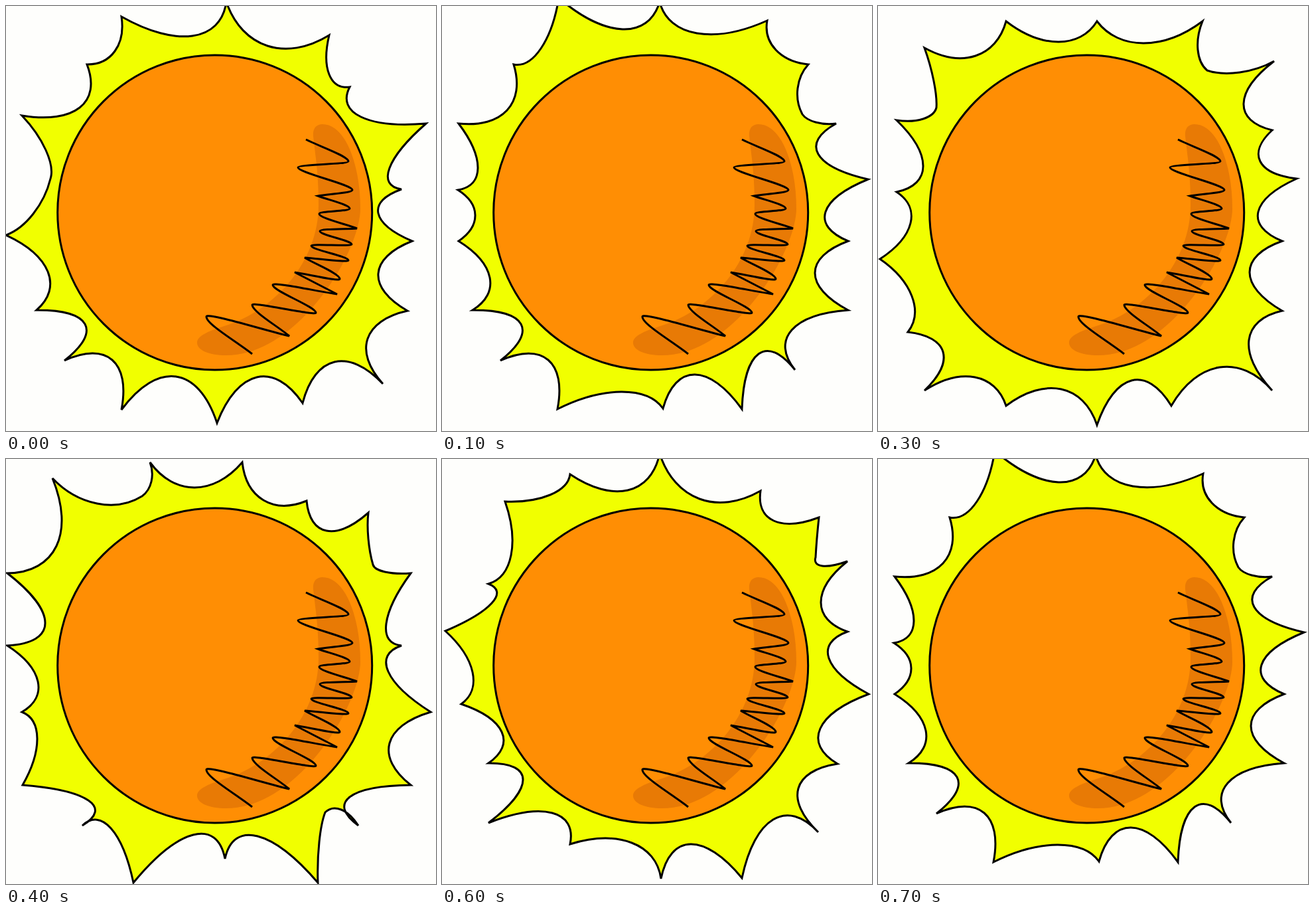
An HTML page for the animation above (0.8 s loop, 648 by 640 pixels).

```html
<!DOCTYPE html>
<html lang="en">
<head>
<meta charset="utf-8">
<title>Sun</title>
<style>
  html, body { margin: 0; width: 100%; height: 100%; overflow: hidden; background: #fefefc; }
  svg { display: block; width: 648px; height: 640px; }
  .ink { stroke: #000; stroke-width: 3; fill: none; }
  .rays { fill: #f1ff00; visibility: hidden; }
  .core { fill: #ff8e04; }
</style>
</head>
<body>
<svg viewBox="0 0 648 640">
  <!-- Ray outlines: tip, dip, tip, dip ... clockwise from the lower right -->
  <path class="ink rays" data-points="568,569 495,536 447,598 378,559 318,628 256,558 174,608 160,533 88,534
    119,479 46,458 63,400 0,345 41,313 67,260 60,217 24,165 111,153 122,88 164,68 174,16 281,45 332,-6
    394,60 487,44 487,103 518,122 535,167 633,177 578,244 596,276 561,312 612,354 561,403 605,459 545,501 568,569"/>
  <path class="ink rays" data-points="532,548 477,524 452,607 381,555 333,606 270,581 174,607 160,533 88,534
    119,479 46,458 72,409 25,354 50,315 24,277 54,244 25,177 98,157 108,88 149,64 176,-12 272,35 328,-6
    384,41 490,22 503,66 552,88 536,124 543,163 563,175 594,177 567,223 642,261 578,310 612,354 562,402 612,458
    527,488 532,548"/>
  <path class="ink rays" data-points="567,562 499,543 452,631 375,580 330,632 286,578 193,580 166,533 70,548
    122,483 70,458 90,411 29,369 46,321 5,259 75,217 70,188 104,145 95,64 163,54 193,23 280,47 328,-8
    388,60 480,48 500,93 568,88 565,120 563,148 573,161 611,154 571,216 611,260 583,300 643,354 570,406 596,459
    537,496 567,562"/>
  <path class="ink rays" data-points="594,579 515,544 442,602 382,564 330,631 276,577 193,602 146,559 70,579
    98,521 45,491 51,437 3,381 49,327 28,280 68,241 28,172 68,170 88,153 84,113 70,63 147,75 193,23 272,54 330,23
    400,56 489,23 482,66 496,97 545,100 597,83 551,147 594,187 576,234 631,260 573,310 609,354 560,401 609,459
    559,503 594,579"/>
  <path class="ink rays" data-points="531,552 505,528 481,532 472,577 470,638 379,568 330,602 282,566 192,638
    158,556 115,552 124,514 25,491 47,421 24,381 48,335 2,281 59,247 2,172 76,131 70,29 137,67 205,56 219,34 217,5
    284,43 356,5 388,62 453,63 483,108 546,81 546,120 553,159 571,170 610,172 573,248 596,281 576,320 640,381
    578,428 610,491 518,509 531,552"/>
  <circle class="ink core" cx="314.7" cy="311" r="237"/>
  <path fill="#e87a05" d="M463 196C462 184 468 178 477 178C512 178 534 240 534 305S440 526 332 526
    C305 526 288 518 288 507S307 489 332 481C405 458 471 385 471 300C471 250 466 225 463 196Z"/>
  <!-- Turning points of the scribble; "!" marks a sharp one -->
  <path class="ink" id="scribble" data-points="452,201! 516,234 440,243 522,277 470,286! 518,305 472,313 529,335!
    473,339 521,359 460,361 516,383 450,379! 503,411 435,401! 499,434! 402,420 467,462 371,450 427,497! 302,468 371,524!"/>
</svg>
<script>
const STEP = 100;
const SPREAD = 0.42;

const readPoints = el => el.dataset.points.trim().split(/\s+/).map(word => {
  const [x, y] = word.split(",").map(parseFloat);
  return { x, y, sharp: word.endsWith("!") };
});

const curve = (a, b, end) => `C${a.x} ${a.y} ${b.x} ${b.y} ${end.x} ${end.y}`;

// Cubic from p to q whose middle is the dip m.
function scallop(p, m, q) {
  const handle = (axis, side) =>
    ((8 * m[axis] - p[axis] - q[axis]) / 3 + side * SPREAD * (p[axis] - q[axis])) / 2;
  return curve({ x: handle("x", 1), y: handle("y", 1) }, { x: handle("x", -1), y: handle("y", -1) }, q);
}

function rayPath(points) {
  let d = `M${points[0].x} ${points[0].y}`;
  for (let i = 2; i < points.length; i += 2) d += scallop(points[i - 2], points[i - 1], points[i]);
  return d;
}

// Round turns leave vertically, sharp ones straight towards the next point.
function scribblePath(points) {
  let d = `M${points[0].x} ${points[0].y}`;
  for (let i = 1; i < points.length; i++) {
    const p = points[i - 1], q = points[i];
    const bend = 3 + 0.15 * Math.abs(q.y - p.y);
    const handle = (from, to, drop) => from.sharp
      ? { x: from.x + 0.3 * (to.x - from.x), y: from.y + 0.3 * (to.y - from.y) }
      : { x: from.x, y: from.y + drop };
    d += curve(handle(p, q, bend), handle(q, p, -bend), q);
  }
  return d;
}

const poses = [...document.querySelectorAll(".rays")];
poses.forEach(el => el.setAttribute("d", rayPath(readPoints(el))));
const scribble = document.getElementById("scribble");
scribble.setAttribute("d", scribblePath(readPoints(scribble)));

const last = poses.length - 1;
const start = performance.now();

// The poses play forwards and then backwards, with hard cuts.
function draw(time) {
  const step = Math.floor(time / STEP) % (2 * last);
  const shown = last - Math.abs(last - step);
  poses.forEach((el, i) => { el.style.visibility = i === shown ? "visible" : "hidden"; });
}

function tick(now) {
  draw(Math.max(0, now - start));
  requestAnimationFrame(tick);
}

draw(0);
requestAnimationFrame(tick);
</script>
</body>
</html>
```
